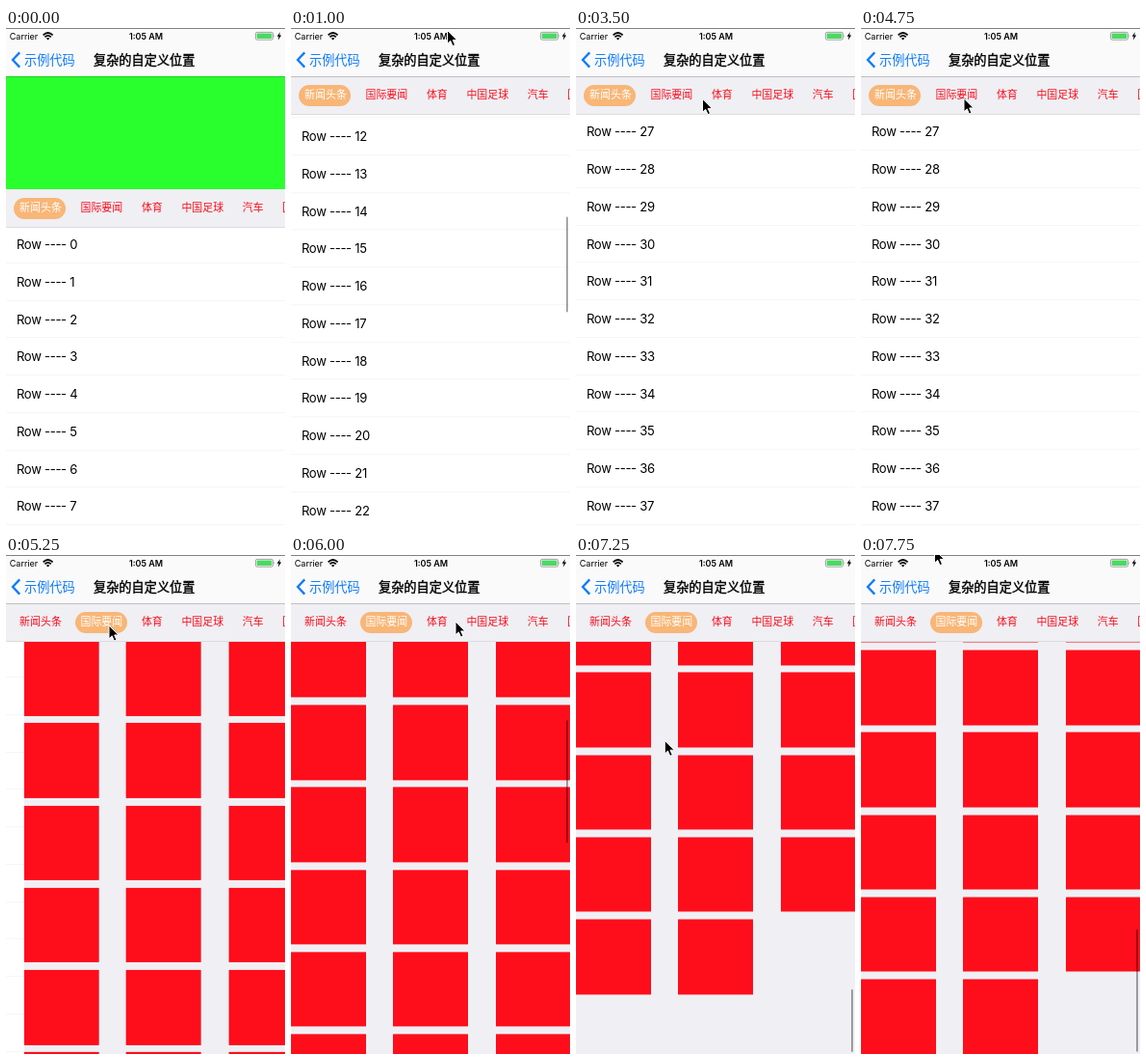
These frames come from a looping animation (290x517 px, 8 s). An HTML page:

```html
<!DOCTYPE html>
<html lang="zh-CN">
<head>
<meta charset="utf-8">
<title>复杂的自定义位置</title>
<style>
  html, body { margin: 0; width: 100%; height: 100%; overflow: hidden; background: #fff; }
  #stage { position: relative; width: 290px; height: 517px; overflow: hidden;
    font-family: Inter, "Noto Sans CJK SC", "Noto Sans CJK", sans-serif; color: #000; }
  #stage div, #stage span, #stage svg { position: absolute; white-space: nowrap; }
  .page { left: 0; top: 0; width: 290px; height: 517px; overflow: hidden; background: #fff; }
  .roll { left: 0; top: 0; width: 290px; }
  .row { left: 0; width: 290px; height: 38.755px; line-height: 39px; box-sizing: border-box;
    padding-left: 10.9px; font-size: 13.1px; letter-spacing: -.3px; }
  .row::after { content: ""; position: absolute; left: 0; right: 0; bottom: 0; height: 1px; background: #f5f5f6; }
  #grid { background: #efeff4; }
  .cell { width: 77.5px; height: 77.5px; background: #fe0d1b; }
  .bar { left: 286px; width: 2px; border-radius: 1px; background: rgba(0, 0, 0, .35); }
  #green { left: 0; width: 290px; height: 117px; background: #2aff2e; }
  #tabs { left: 0; width: 290px; height: 39px; background: #efeff4; box-shadow: 0 1px 0 #dcdce0; overflow: hidden; }
  #pill { top: 9px; width: 54px; height: 22px; border-radius: 11px; background: #f8b677; }
  .tab { top: 0; line-height: 39px; font-size: 10.95px; color: #fb0d1b; }
  .tab.on { color: #fff; }
  #nav { left: 0; top: 0; width: 290px; height: 50px; background: #fafafa;
    box-shadow: 0 1px 0 rgba(0, 0, 0, .2), inset 0 1px 0 #808080; }
  .status { top: 2px; line-height: 13px; font-size: 9px; }
  .head { top: 23px; line-height: 20px; font-size: 13.2px; }
  .title { -webkit-text-stroke: .4px #000; }
  #cursor { left: 0; top: 0; overflow: visible; }
</style>
</head>
<body>
<div id="stage">
  <div id="list" class="page"><div class="roll"></div><div class="bar"></div></div>
  <div id="grid" class="page"><div class="roll"></div><div class="bar"></div></div>
  <div id="green"></div>
  <div id="tabs"><div id="pill"></div></div>
  <div id="nav">
    <span class="status" style="left:3.8px">Carrier</span>
    <span class="status" style="left:0;width:291px;text-align:center;font-weight:600">1:05 AM</span>
    <svg width="290" height="50" viewBox="0 0 290 50" fill="none">
      <path d="M38.6 7.3Q43.6 2.7 48.6 7.3M40.4 9.4Q43.6 6.4 46.8 9.4" stroke="#000" stroke-width="1.7"/>
      <path d="M41.9 10.7Q43.6 9.2 45.3 10.7L43.6 12.5Z" fill="#000"/>
      <rect x="259.4" y="4.4" width="18.2" height="7.8" rx="1.7" stroke="#8f8f91" stroke-width=".8"/>
      <rect x="260.6" y="5.6" width="15.8" height="5.4" rx=".8" fill="#4cd964"/>
      <path d="M278.6 6.8Q280 8.3 278.6 9.8Z" fill="#8f8f91"/>
      <path d="M284.9 4.2L281.7 8.8H283.6L282.9 12.4L286.2 7.6H284.2Z" fill="#000"/>
      <path d="M14.2 25.4L7 33L14.2 40.6" stroke="#0f7bff" stroke-width="2.3"/>
    </svg>
    <span class="head" style="left:19px;color:#0f7bff">示例代码</span>
    <span class="head title" style="left:91px">复杂的自定义位置</span>
  </div>
  <svg id="cursor" width="12" height="18" viewBox="0 0 12 18">
    <path d="M.5 .5V14.3L3.7 11.3L6 16.6L8.5 15.5L6.2 10.4H10.6Z" fill="#000" stroke="#fff" stroke-width="1"/>
  </svg>
</div>
<script>
const LOOP = 8000, STEP = 250, SWITCH = 4750;
const ROW = 38.755, ROWS = 48, CELL_X = 106.3, CELL_Y = 85.25, CELLS = 50;
const NAV = 50.3, HEADER = 116.25, STICKY = 88.9, VIEW = 517 - STICKY;
const LIST_MAX = ROWS * ROW - VIEW;
const GRID_MAX = Math.ceil(CELLS / 3) * CELL_Y - 7.75 - VIEW;

const $ = (q) => document.querySelector(q);
const add = (parent, cls, text = "") => {
  const el = document.createElement("div");
  el.className = cls;
  el.textContent = text;
  return parent.appendChild(el);
};
const move = (el, x, y) => { el.style.transform = `translate(${x}px, ${y}px)`; };

// Progress 0..1 between two times, and easings
const part = (t, from, to) => Math.min(1, Math.max(0, (t - from) / (to - from)));
const easeOut = (k) => 1 - (1 - k) ** 2;
const smooth = (k) => k * k * (3 - 2 * k);
const cubic = (k) => k < .5 ? 4 * k ** 3 : 1 - 4 * (1 - k) ** 3;

const listRoll = $("#list .roll"), gridRoll = $("#grid .roll");
for (let i = 0; i < ROWS; i++) add(listRoll, "row", "Row ---- " + i).style.top = i * ROW + "px";
for (let i = 0; i < CELLS; i++) {
  const s = add(gridRoll, "cell").style;
  s.left = (i % 3) * CELL_X + "px";
  s.top = Math.floor(i / 3) * CELL_Y + "px";
}
let tabX = 14.1;
const tabs = ["新闻头条", "国际要闻", "体育", "中国足球", "汽车", "国内"].map((name) => {
  const el = add($("#tabs"), "tab", name);
  el.style.left = tabX + "px";
  tabX += name.length * 10.95 + 19.6;
  return el;
});

// Two flicks of the list
const listScroll = (t) => 643.8 * smooth(part(t, 0, 1250)) + 519.2 * easeOut(part(t, 1500, 3250));

// One long flick of the grid, then a pull past its end that springs back
function gridScroll(t) {
  if (t > 6750) return GRID_MAX + 63 * Math.sin(Math.PI * (7750 - Math.min(t, 7750)) / 1125);
  return (GRID_MAX + 21.5) * cubic(part(t, 5490, 6750));
}

// Where the pointer turns or rests: ms, x, y
const stops = [[250, 165, 440], [1000, 162, 2], [1500, 160, 370], [2000, 155, 34.5], [3000, 131, 73],
  [4250, 131, 73], [4750, 106.5, 72.5], [5250, 106.5, 72.5], [5600, 165, 300], [6000, 170.5, 68.5],
  [6750, 107.5, 389.5], [7750, 76, -6]];
function pointer(t) {
  const i = Math.max(1, stops.findIndex((p) => p[0] >= t));
  const [from, x, y] = stops[i - 1], [to, x2, y2] = stops[i];
  const k = smooth(part(t, from, to));
  return [x + (x2 - x) * k, y + (y2 - y) * k];
}

function setBar(el, top, pos, max, opacity) {
  const len = VIEW * VIEW / (VIEW + max) - Math.max(0, pos - max);
  el.style.height = len + "px";
  el.style.opacity = opacity;
  move(el, 0, top + 2 + Math.min(1, pos / max) * (513 - top - len));
}

function draw(t) {
  const s = listScroll(t), g = gridScroll(t), lift = Math.min(s, HEADER);
  const slide = 290 * (1 - easeOut(part(t, SWITCH, SWITCH + 670)));
  const active = t > SWITCH ? 1 : 0;

  move($("#green"), 0, Math.round(NAV - lift));
  move($("#tabs"), 0, Math.round(NAV + HEADER - lift));
  move(listRoll, 0, STICKY + HEADER - s);
  move(gridRoll, 0, STICKY - g);
  move($("#list"), slide - 290, 0);
  move($("#grid"), slide, 0);

  setBar($("#list .bar"), STICKY + HEADER - lift, s - lift, LIST_MAX, s > 0 ? 1 - part(t, 3000, 3500) : 0);
  setBar($("#grid .bar"), STICKY, g, GRID_MAX, g > 1 ? 1 : 0);

  $("#pill").style.left = 8.3 + active * 63.3 + "px";
  tabs.forEach((el, i) => el.classList.toggle("on", i === active));

  $("#cursor").style.visibility = t < STEP ? "hidden" : "visible";
  move($("#cursor"), ...pointer(t));
}

const start = performance.now();
function tick() {
  const t = (performance.now() - start) % LOOP;
  draw(Math.floor(t / STEP) * STEP);
  requestAnimationFrame(tick);
}
tick();
</script>
</body>
</html>
```
